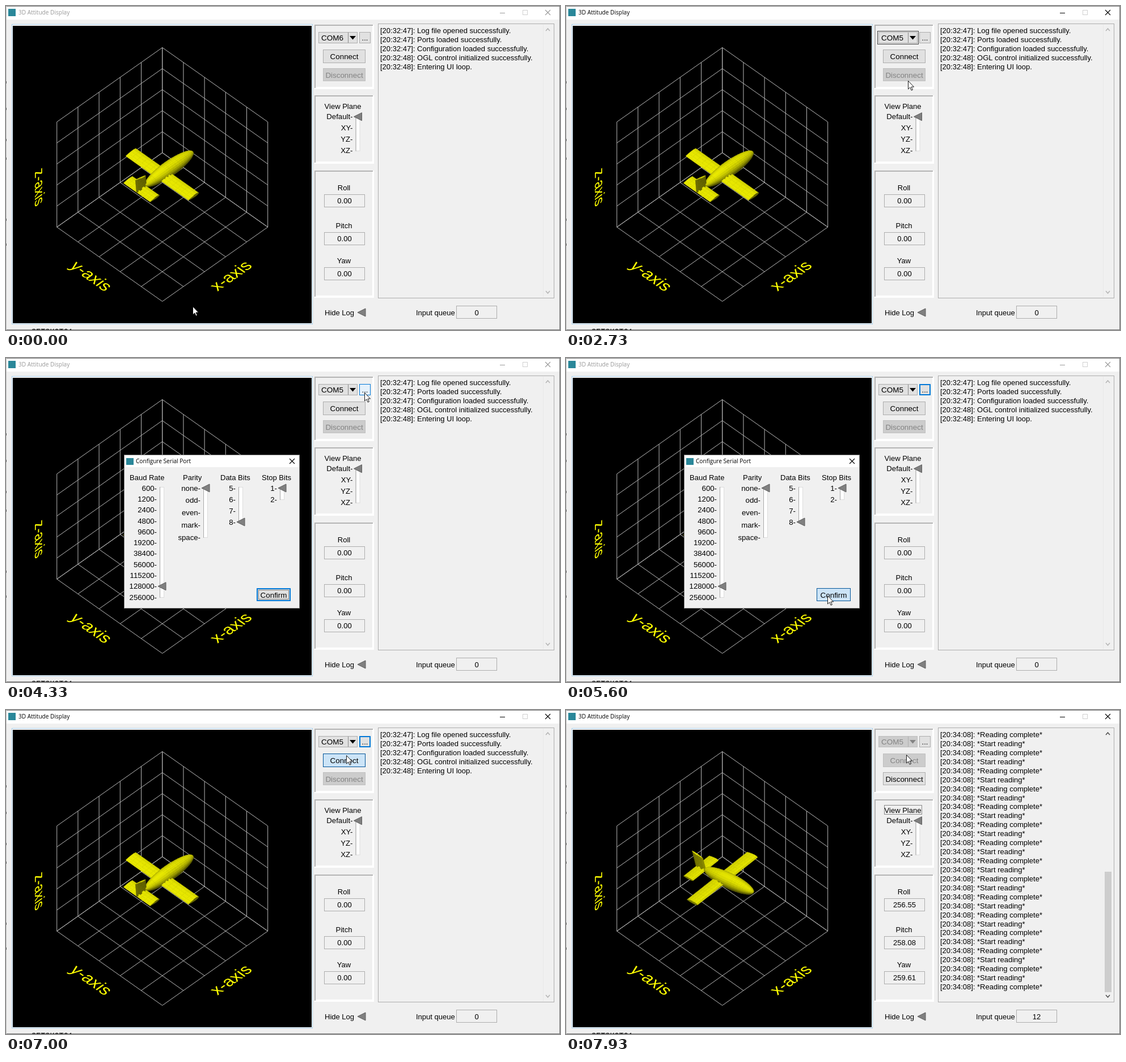
Write an HTML page with a canvas that moves like this. It is 977 px wide and 573 px high and loops after 8 s.

```html
<!DOCTYPE html>
<html lang="en">
<head>
<meta charset="utf-8">
<title>3D Attitude Display</title>
<style>
html, body { margin: 0; width: 100%; height: 100%; overflow: hidden; background: #f0f0f0; }
canvas { display: block; }
</style>
</head>
<body>
<canvas id="stage" width="977" height="573"></canvas>
<script>
const W = 977, H = 573, LOOP = 8000, TICK = 1000 / 15;
const main = document.getElementById('stage').getContext('2d');
const layer = document.createElement('canvas');
layer.width = W; layer.height = H;
const over = layer.getContext('2d');
let g = main;

const UI = '"Liberation Sans", Arial, sans-serif';
const CAPTION = '"Open Sans", "Noto Sans", sans-serif';
const lerp = (a, b, k) => a + (b - a) * k;

// ---------- drawing helpers ----------
function text(s, x, y, { size = 13, align = 'left', color = '#000', face = UI } = {}) {
  g.font = `${size}px ${face}`;
  g.textAlign = align;
  g.fillStyle = color;
  g.fillText(s, x, y);
}
function fill(x, y, w, h, color) { g.fillStyle = color; g.fillRect(x, y, w, h); }
function box(x, y, w, h, bg, edge) {
  fill(x, y, w, h, edge);
  fill(x + 1, y + 1, w - 2, h - 2, bg);
}
function poly(points, color, edge, width = 1) {
  g.beginPath();
  points.forEach(([x, y]) => g.lineTo(x, y));
  g.closePath();
  if (color) { g.fillStyle = color; g.fill(); }
  if (edge) { g.strokeStyle = edge; g.lineWidth = width; g.stroke(); }
}
function line(x1, y1, x2, y2, color, width = 1) {
  g.strokeStyle = color; g.lineWidth = width;
  g.beginPath(); g.moveTo(x1, y1); g.lineTo(x2, y2); g.stroke();
}
function dotted(x, y, w, h) {
  g.setLineDash([1, 1]);
  g.strokeStyle = '#222'; g.lineWidth = 1;
  g.strokeRect(x + .5, y + .5, w - 1, h - 1);
  g.setLineDash([]);
}
function leftArrow(x, y) {
  poly([[x, y], [x + 14, y - 7], [x + 14, y + 7]], '#808080', '#5c5c5c');
}
function chevron(x, y, dir, color) {
  g.strokeStyle = color; g.lineWidth = 1.5;
  g.beginPath();
  g.moveTo(x - 3.5, y + 2 * dir); g.lineTo(x, y - 2 * dir); g.lineTo(x + 3.5, y + 2 * dir);
  g.stroke();
}
function closeMark(x, y, color) {
  line(x - 4.5, y - 4.5, x + 4.5, y + 4.5, color, 1.1);
  line(x - 4.5, y + 4.5, x + 4.5, y - 4.5, color, 1.1);
}
const LOOKS = {
  normal: ['#e1e1e1', '#adadad'], hover: ['#e5f1fb', '#0078d7'],
  press: ['#cce4f7', '#005499'], off: ['#cccccc', '#bfbfbf'], focus: ['#e1e1e1', '#0078d7']
};
function button(label, x, y, w, h, look, size = 13.4) {
  const [bg, edge] = LOOKS[look];
  box(x, y, w, h, bg, edge);
  if (look === 'focus') box(x + 1, y + 1, w - 2, h - 2, bg, edge);
  text(label, x + w / 2, y + h / 2 + 5, { size, align: 'center', color: look === 'off' ? '#838383' : '#000' });
}
function slider(labels, right, y, step, pick) {
  labels.forEach((s, i) => text(s + '-', right, y + i * step + 4.6, { align: 'right', size: 13.2 }));
  const h = step * (labels.length - 1);
  box(right + 5, y - 2, 8, h + 3, '#fff', '#dcdcdc');
  fill(right + 5, y - 2, 1, h + 3, '#a8a8a8');
  leftArrow(right + 2, y + pick * step);
}
function panel(y, h) {
  fill(544, y, 105, h, '#fff');
  fill(544, y, 103, h - 2, '#b4b4b4');
  fill(546, y + 2, 101, h - 4, '#f0f0f0');
  fill(546, y + h - 4, 103, 3, '#fff');
  fill(646, y + 2, 3, h - 3, '#fff');
}
function field(label, value, y) {
  text(label, 596, y - 7, { align: 'center' });
  box(561, y, 72, 23, '#f0f0f0', '#adadad');
  text(value, 597, y + 16, { align: 'center' });
}

// ---------- aircraft mesh: x nose, y port, z up ----------
const faces = [];
function part(rings) {
  const all = rings.flat();
  const mid = [0, 1, 2].map(k => all.reduce((s, p) => s + p[k], 0) / all.length);
  const add = pts => {
    const c = [0, 1, 2].map(k => pts.reduce((s, p) => s + p[k], 0) / pts.length);
    const q = Math.floor(pts.length / 4);
    const u = pts[2 * q].map((v, k) => v - pts[0][k]);
    const w = pts[3 * q].map((v, k) => v - pts[q][k]);
    let n = [u[1] * w[2] - u[2] * w[1], u[2] * w[0] - u[0] * w[2], u[0] * w[1] - u[1] * w[0]];
    const len = Math.hypot(...n);
    if (len < 1e-6) return;
    const out = n.reduce((s, v, k) => s + v * (c[k] - mid[k]), 0) < 0 ? -1 : 1;
    faces.push({ pts, c, n: n.map(v => v * out / len) });
  };
  for (let i = 0; i + 1 < rings.length; i++) {
    const a = rings[i], b = rings[i + 1];
    a.forEach((p, j) => {
      const k = (j + 1) % a.length;
      add([p, a[k], b[k], b[j]]);
    });
  }
  add(rings[0]);
  add(rings[rings.length - 1]);
}
const range = (n, f) => Array.from({ length: n }, (_, i) => f(i));
const ring = (n, f) => range(n, j => f(Math.cos(j / n * 2 * Math.PI), Math.sin(j / n * 2 * Math.PI)));
function wing(x, half, chord, thick, cuts) {
  part(range(cuts + 1, i => ring(12, (c, s) =>
    [x + chord / 2 * c, lerp(-half, half, i / cuts), thick * s * (1 + .4 * c)])));
}
part(range(25, i => {
  const a = lerp(.01, Math.PI - .01, i / 24), r = 13.5 * Math.sin(a);
  return ring(24, (c, s) => [17 + 59 * Math.cos(a), r * c, 2.5 + r * s]);
}));
wing(0, 78, 26, 2.6, 14);
wing(-52, 33, 23, 2, 8);
part(range(5, i => {
  const k = i / 4;
  return ring(8, (c, s) => [-52 - 2.5 * k + 12.5 * c, 1.3 * s, k * (30 - 3 * c)]);
}));

// ---------- scene ----------
const CX = 275.7, CY = 298;
const project = ([x, y, z]) => [CX + .7071 * (x - y), CY - .5 * (x + y) - .7071 * z];

function turner(roll, pitch, yaw) {
  const rad = Math.PI / 180;
  const [cr, sr, cp, sp, cy, sy] = [-roll, -pitch, yaw].flatMap(a => [Math.cos(a * rad), Math.sin(a * rad)]);
  return ([x, y, z]) => {
    [y, z] = [y * cr - z * sr, y * sr + z * cr];
    [x, y] = [x * cy - y * sy, x * sy + y * cy];
    return [x * cp + z * sp, y, z * cp - x * sp];
  };
}
function aircraft(angles) {
  const turn = turner(...angles), shown = [];
  for (const f of faces) {
    const n = turn(f.n);
    if (-.5 * n[0] - .5 * n[1] + .7071 * n[2] <= 0) continue;
    const c = turn(f.c);
    const lit = .32 + .6 * Math.max(0, -.28 * n[0] - .12 * n[1] + .95 * n[2]);
    shown.push({ pts: f.pts, lit, depth: -.5 * c[0] - .5 * c[1] + .7071 * c[2] });
  }
  shown.sort((a, b) => a.depth - b.depth);
  for (const f of shown) {
    const v = Math.round(255 * f.lit), color = `rgb(${v},${v},0)`;
    poly(f.pts.map(p => project(turn(p))), color, color, .6);
  }
}
function axisLabel(s, x, y, ax, ay, ux, uy) {
  g.save();
  g.transform(ax, ay, -ux, -uy, x, y);
  text(s, 0, 0, { size: 34, color: '#ff0' });
  g.restore();
}
function scene(angles) {
  box(10, 32, 531, 531, '#fff', '#a6cdea');
  fill(12, 35, 527, 526, '#000');
  const R = 131.5, seg = (a, b) => line(...project(a), ...project(b), '#b8b8b8', 1);
  for (let i = 0; i <= 5; i++) {
    const v = lerp(-R, R, i / 5);
    seg([v, -R, -R], [v, R, -R]);
    seg([-R, v, -R], [R, v, -R]);
    seg([v, R, -R], [v, R, R]);
    seg([-R, R, v], [R, R, v]);
    seg([R, v, -R], [R, v, R]);
    seg([R, -R, v], [R, R, v]);
  }
  axisLabel('x-axis', 373, 505, .7071, -.5, -.7071, -.5);
  axisLabel('y-axis', 111, 461, .7071, .5, .7071, -.5);
  axisLabel('z-axis', 51, 294, 0, .7071, .7071, -.5);
  aircraft(angles);
}

// ---------- window ----------
const OPENING = ['47]: Log file opened', '47]: Ports loaded', '47]: Configuration loaded', '48]: OGL control initialized'];
function logLine(i) {
  if (i < 4) return `[20:32:${OPENING[i]} successfully.`;
  if (i === 4) return '[20:32:48]: Entering UI loop.';
  return '[20:34:08]: ' + (i % 2 ? '*Start reading*' : '*Reading complete*');
}
function logBox(count) {
  const rows = 29, first = Math.max(0, count - rows);
  box(656, 31, 311, 486, '#f0f0f0', '#adadad');
  for (let i = first; i < count; i++) text(logLine(i), 660, 48 + (i - first) * 15.93);
  const full = count > rows, ink = full ? '#505050' : '#b5b5b5';
  if (full) {
    const size = 448 * rows / count;
    fill(950, 499 - size, 12, size, '#cdcdcd');
  } else {
    fill(947, 33, 1, 482, '#e8e8e8');
  }
  chevron(955.5, 42, 1, ink);
  chevron(955.5, 506, -1, ink);
}
function frameBar(active) {
  const ink = active ? '#000' : '#999';
  fill(0, 0, W, H, '#f0f0f0');
  fill(0, 0, W, 24, '#fff');
  fill(4, 5, 13, 13, '#2a8799');
  text('3D Attitude Display', 22, 15, { size: 10.1, face: CAPTION, color: ink });
  fill(871, 12, 9, 1, ink);
  g.strokeStyle = '#d0d0d0'; g.lineWidth = 1;
  g.strokeRect(911.5, 7.5, 8, 8);
  closeMark(955.5, 11.5, ink);
  fill(0, 0, W, 1, '#777');
  fill(976, 0, 1, H, '#777');
  fill(0, 572, W, 1, '#777');
  fill(0, 0, 1, H, '#c4c4c4');
  [133, 180, 235, 268, 376, 420].forEach(y => fill(0, y, 1, 4, '#555'));
  g.save();
  g.beginPath(); g.rect(40, 571, 100, 2); g.clip();
  text('SETSKOTO1', 45, 580, { size: 13.5, face: '"Liberation Mono", monospace' });
  g.restore();
}
function combo(port, off, focus) {
  if (focus) box(549, 44, 73, 24, '#f0f0f0', '#444');
  box(551, 46, 69, 20, off ? '#ccc' : '#e1e1e1', off ? '#bfbfbf' : '#adadad');
  const ink = off ? '#838383' : '#000';
  text(port, 556, 61, { size: 13.5, color: ink });
  fill(603, 47, 1, 18, off ? '#b0b0b0' : '#888');
  poly([[606, 53], [617, 53], [611.5, 59.5]], ink);
}
function menu(hot) {
  fill(552, 69, 89, 126, '#777');
  box(550, 67, 89, 126, '#f0f0f0', '#c8c8c8');
  ['1', '3', '4', '5', '6', '7'].forEach((p, i) => {
    const y = 78.3 + i * 20.4;
    if (i === hot) fill(553, Math.round(y - 10), 85, 20, '#91c9f7');
    text('COM' + p, 566, y + 4.8, { size: 13.5 });
  });
  g.strokeStyle = '#000'; g.lineWidth = 1.8;
  g.beginPath(); g.moveTo(556, 157.5); g.lineTo(558.5, 160.5); g.lineTo(564, 154.5); g.stroke();
}
function dialog(look) {
  box(208, 171, 310, 272, '#f0f0f0', '#8a8a8a');
  fill(209, 172, 308, 21, '#fff');
  fill(212, 177, 13, 12, '#2a8799');
  text('Configure Serial Port', 229, 186, { size: 10.1, face: CAPTION });
  closeMark(504.5, 182.5, '#000');
  text('Baud Rate', 218, 216);
  text('Parity', 312, 216);
  text('Data Bits', 378, 216);
  text('Stop Bits', 451, 216);
  slider('600 1200 2400 4800 9600 19200 38400 56000 115200 128000 256000'.split(' '), 266, 230, 19.3, 9);
  slider(['none', 'odd', 'even', 'mark', 'space'], 343, 230, 21.75, 0);
  slider(['5', '6', '7', '8'], 405, 230, 20, 3);
  slider(['1', '2'], 478, 230, 20, 0);
  button('Confirm', 442, 407, 60, 23, look);
  if (look === 'focus') dotted(445, 410, 54, 17);
}
function fadeDialog(alpha, look) {
  if (alpha <= 0) return;
  g = over;
  g.clearRect(0, 0, W, H);
  dialog(look);
  g = main;
  const k = lerp(.95, 1, alpha);
  g.save();
  g.globalAlpha = alpha;
  g.translate(363, 307); g.scale(k, k); g.translate(-363, -307);
  g.drawImage(layer, 0, 0);
  g.restore();
}
function pointer(x, y) {
  const shape = [[0, 0], [0, 14.5], [3.3, 11.4], [5.6, 16.7], [7.8, 15.7], [5.5, 10.6], [10, 10.6]];
  poly(shape.map(([a, b]) => [x + .5 + a, y + .5 + b]), '#fff', '#000', .9);
}

// ---------- timeline, counted in ticks of 1/15 s ----------
const PATH = [
  [0, 329, 531], [1, 312, 536], [2, 262, 549], [3, 178, 566], [4, 90, 600], [9, 300, 600],
  [10, 330, 560], [13, 470, 300], [16, 602, 72], [18, 607, 52], [27, 607, 51], [28, 607, 56],
  [30, 606, 90], [33, 605, 138], [40, 605, 138], [42, 600, 126], [44, 639, 105], [46, 642, 74],
  [49, 632, 57], [59, 632, 57], [63, 632, 61], [71, 632, 61], [72, 612, 110], [73, 540, 290],
  [74, 458, 428], [75, 461, 420], [88, 461, 420], [90, 492, 360], [93, 575, 205], [96, 613, 112],
  [97, 607, 95], [99, 600, 80], [118, 600, 80], [119, 600, 79]
];
function track(keys, n) {
  const i = keys.findIndex(k => k[0] > n);
  if (i < 0) return keys[keys.length - 1].slice(1);
  const a = keys[i - 1], b = keys[i], k = (n - a[0]) / (b[0] - a[0]);
  return a.slice(1).map((v, j) => lerp(v, b[j + 1], k));
}
const FADE = [[0, 0], [60, 0], [61, .3], [62, .65], [64, 1], [84, 1], [85, .85], [86, .5], [87, .19], [88, .05], [89, 0]];

function draw(n) {
  const [mx, my] = track(PATH, n);
  const between = (a, b) => n >= a && n < b;
  const linked = n >= 107, k = linked ? n - 107 : 0;
  const angles = [0, 1, 2].map(i => linked ? (14 * k + i) * 278 * 360 / 65536 : 0);

  frameBar(between(19, 61) || n >= 86);
  scene(angles);

  panel(33, 114);
  combo(n < 37 ? 'COM6' : 'COM5', linked, between(37, 60));
  const more = between(47, 59) || between(61, 72) ? 'hover' : between(59, 61) ? 'press'
    : between(72, 107) ? 'focus' : 'normal';
  button('...', 623, 46, 20, 20, more, 13);
  const link = linked ? 'off' : n === 105 ? 'press' : n >= 97 ? 'hover' : 'normal';
  button('Connect', 559, 77, 75, 24, link);
  button('Disconnect', 559, 110, 75, 23, linked ? 'normal' : 'off');

  panel(158, 121);
  text('View Plane', 594, 181.5, { align: 'center' });
  if (linked) dotted(561, 168, 67, 17);
  slider(['Default', 'XY', 'YZ', 'XZ'], 611.5, 195.7, 20, 0);

  panel(291, 225);
  field('Roll', angles[0].toFixed(2), 333);
  field('Pitch', angles[1].toFixed(2), 400);
  field('Yaw', angles[2].toFixed(2), 462);

  text('Hide Log', 562, 546.5);
  leftArrow(620, 542);
  text('Input queue', 723, 546.5);
  box(794, 530, 72, 23, '#f0f0f0', '#adadad');
  text(k ? '12' : '0', 830, 546.5, { align: 'center' });
  logBox(5 + 2 * Math.round(28 * k / 12));

  if (between(20, 37)) {
    const row = Math.floor((my - 68) / 20.4);
    menu(row >= 0 ? row : -1);
  }
  fadeDialog(track(FADE, n)[0], n === 84 ? 'press' : between(74, 84) ? 'hover' : 'focus');
  pointer(Math.round(mx), Math.round(my));
}

const start = performance.now();
let last = -1;
function loop() {
  const t = (performance.now() - start) % LOOP;
  const n = Math.floor((t + 4) / TICK) % 120;
  if (n !== last) draw(last = n);
  requestAnimationFrame(loop);
}
loop();
</script>
</body>
</html>
```
